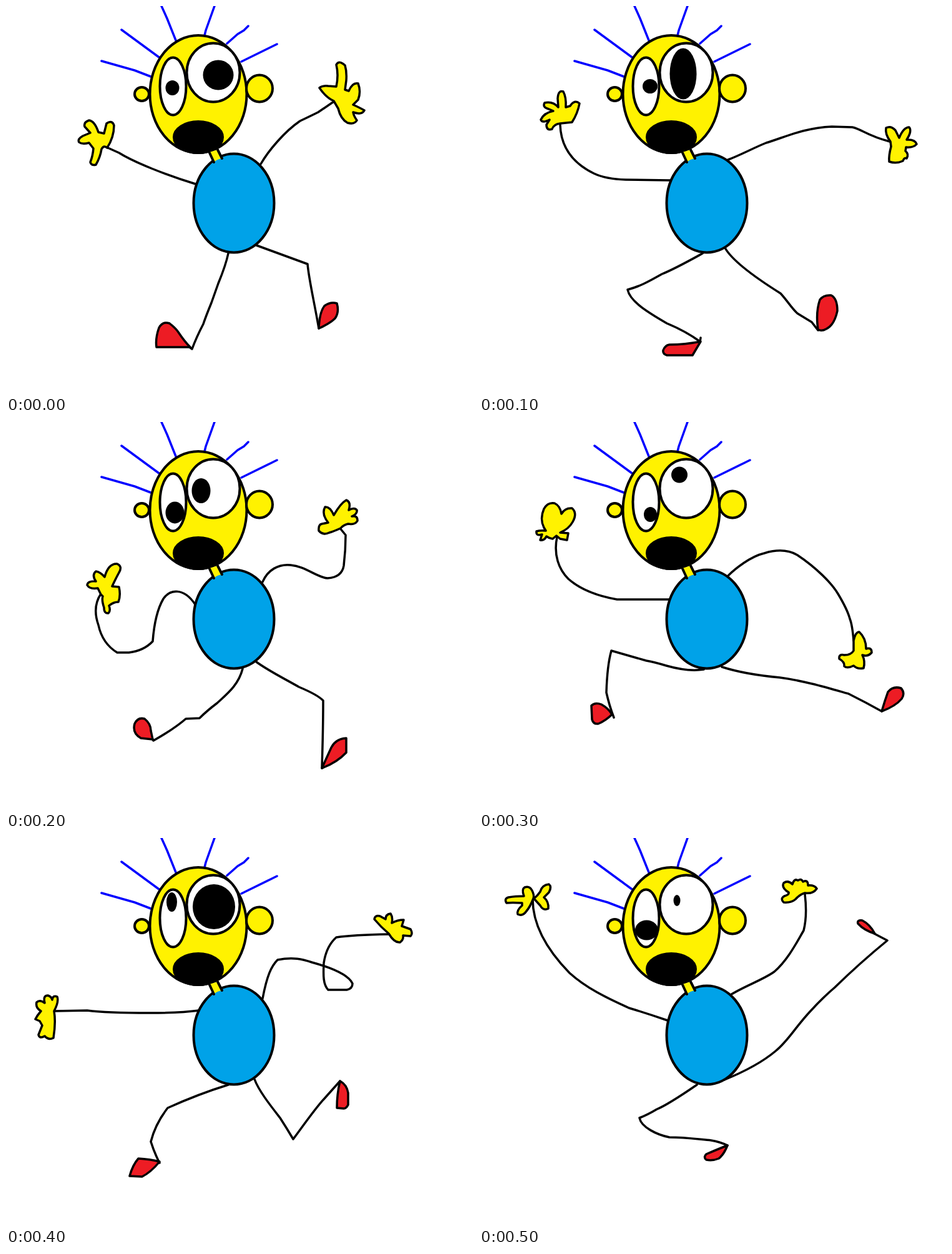
Animation of 748 by 621 pixels, one loop 600 ms. Source, as an HTML page:

```html
<!DOCTYPE html>
<html lang="en">
<head>
<meta charset="utf-8">
<title>Dancing figure</title>
<style>
  html, body { margin: 0; width: 100%; height: 100%; overflow: hidden; background: #fff; }
  svg { display: block; width: 748px; height: 621px; }
  path, ellipse { stroke: #000; stroke-linecap: round; stroke-linejoin: round; }
  .figure { stroke-width: 4; }
  .figure path, .figure ellipse { stroke-width: 4; }
  .figure .hair { fill: none; stroke: #00f; stroke-width: 3.5; }
  .skin { fill: #fff200; }
  .white { fill: #fff; }
  .shirt { fill: #00a2e8; }
  .limbs { fill: none; stroke-width: 3.5; }
  .hands { fill: #fff200; stroke-width: 3.5; }
  .shoes { fill: #ed1c24; stroke-width: 3.5; }
  .pose ellipse { stroke: none; }

  /* Each pose holds for one sixth of the loop. */
  .pose {
    visibility: hidden;
    animation: hold 600ms step-end infinite;
    animation-delay: calc(var(--i) * 100ms - 600ms);
  }
  @keyframes hold {
    0% { visibility: visible; }
    16.666%, 100% { visibility: hidden; }
  }
</style>
</head>
<body>
<svg viewBox="0 0 748 621">
  <g class="figure">
    <path class="hair" d="M153 88L206 103L232 113M185 38L245 82M249 0L258 20L272 55M334 0L320 39L318 47M354 60L371 45L381 39L388 32M377 89L434 61"/>
    <ellipse class="skin" cx="308" cy="141" rx="77.5" ry="94"/>
    <ellipse class="skin" cx="217.500" cy="141" rx="11.5" ry="11"/>
    <ellipse class="skin" cx="406" cy="132" rx="21" ry="21.5"/>
    <ellipse class="white" cx="267.500" cy="128.500" rx="21" ry="46"/>
    <ellipse class="white" cx="332" cy="106.500" rx="42.500" ry="47"/>
    <ellipse cx="308" cy="210" rx="39" ry="25"/>
    <ellipse class="shirt" cx="365" cy="315.500" rx="64.500" ry="79"/>
    <path class="skin" stroke="none" style="stroke:none" d="M326 234L339 230L346 244Q338 245 333 250Z"/>
    <path fill="none" d="M326 235L333 250M339 230L346 244"/>
  </g>

  <g class="pose" style="--i:0">
    <path class="limbs" d="M161 226L181 235C205 250 255 270 304 285M408 253C420 232 446 201 471 184Q490 175 500 170L525 153M356 396Q352 415 340 444L329 475Q320 497 316 509Q305 530 298 549L294 546M401 383L483 413C485 437 493 470 501 516"/>
    <path class="hands" d="M162 227Q173 210 173 191Q170 182 161 188Q159 196 157 204L148 202Q142 184 133 183Q124 186 126 193L135 203L123 208Q114 213 117 218Q122 222 133 219L140 228Q139 240 135 250Q137 256 144 254Q151 242 153 229Q157 222 162 227Z"/>
    <path class="hands" d="M525 152Q512 146 502 131Q506 127 516 128L529 129Q533 110 529 94Q533 86 543 95Q546 105 545 119L543 134L549 136Q555 122 564 124Q569 137 564 150L556 158Q567 163 574 167Q570 175 556 170Q557 176 562 183Q558 190 547 187Q536 181 532 164Z"/>
    <path class="shoes" d="M295 546L241 546Q239 532 245 515Q251 504 262 508Q272 516 276 522Q286 537 295 546ZM501 516Q502 490 510 480Q520 473 530 476Q534 490 527 500Q519 508 501 516Z"/>
    <ellipse cx="266.500" cy="131" rx="11" ry="12"/>
    <ellipse cx="340" cy="110.500" rx="24.500" ry="24"/>
  </g>

  <g class="pose" style="--i:1">
    <path class="limbs" d="M130 190C131 222 147 250 184 268Q203 277 235 278L306 279M399 246C420 238 440 227 460 219C490 210 520 195 565 193L598 194C615 198 620 207 658 217M358 396C338 407 313 421 293 429C270 442 257 449 238 454C242 473 270 490 301 508Q330 520 354 537L355 531M394 387C405 407 440 433 483 460C495 473 500 483 510 492L533 506L543 519"/>
    <path class="hands" d="M130 188L149 186Q158 172 161 156Q153 149 146 160L139 162Q140 146 135 137Q127 134 126 148L127 162Q118 152 105 155Q101 162 112 165L119 168Q104 171 99 182Q101 188 113 182L108 190Q108 200 117 197Q120 189 130 188Z"/>
    <path class="hands" d="M659 217Q650 205 652 195Q660 191 667 199L673 211Q680 194 689 194Q694 200 685 214Q698 213 701 221Q696 227 684 226L683 232Q689 237 685 244Q681 242 679 248Q668 253 657 249Q656 240 660 225Z"/>
    <path class="shoes" d="M355 537L342 559L301 559Q294 557 295 551Q298 543 305 542Q330 542 355 537ZM543 518Q539 490 546 470Q552 462 564 463Q574 468 574 488Q569 511 556 517Q549 521 543 518Z"/>
    <ellipse cx="274" cy="128.500" rx="12" ry="11.500"/>
    <ellipse cx="327" cy="108.500" rx="21.500" ry="41"/>
  </g>

  <g class="pose" style="--i:2">
    <path class="limbs" d="M152 275C142 290 142 308 148 325C153 348 165 361 178 369L197 369Q221 366 235 351C237 325 242 300 252 283C263 267 285 265 303 292M411 256C419 237 436 227 456 229C480 231 498 249 515 250C531 249 539 242 541 230Q544 205 544 181L535 170M379 395C372 422 353 436 338 450Q322 462 310 474L288 475C272 489 252 501 236 510L234 506M401 384C420 398 450 413 469 424Q500 437 508 446Q508 490 506 554"/>
    <path class="hands" d="M152 276L147 266Q134 268 130 261Q131 254 144 255Q137 245 144 239Q151 240 158 248Q164 226 178 227Q187 231 181 241Q175 252 170 263L181 264Q184 278 180 288Q172 288 165 294Q168 302 164 306Q157 307 157 297Q153 285 155 279Z"/>
    <path class="hands" d="M536 170Q525 175 518 177Q508 182 501 174Q500 164 506 163L516 161Q505 147 511 136Q519 135 525 149Q536 130 545 125Q553 128 549 141Q558 136 562 141Q563 147 554 151Q563 149 563 158Q559 165 548 163Q540 165 536 170Z"/>
    <path class="shoes" d="M235 508L216 506Q202 498 206 483Q211 472 222 475Q232 483 232 494ZM506 554L521 521Q528 507 545 506L545 529Q530 545 506 554Z"/>
    <ellipse cx="270.500" cy="145" rx="15" ry="17.500"/>
    <ellipse cx="312.500" cy="110" rx="15" ry="20"/>
  </g>

  <g class="pose" style="--i:3">
    <path class="limbs" d="M125 184C119 213 128 236 143 251Q170 275 221 284L305 284M399 246C410 235 435 215 457 210C480 203 498 206 510 213C540 233 565 258 575 275Q590 300 594 315Q598 325 600 350M360 396Q335 400 300 390Q280 384 268 382L212 366C208 380 205 400 204 433Q209 455 216 473M389 392C420 402 460 407 482 409C520 414 560 426 592 435Q620 449 645 463"/>
    <path class="hands" d="M104 169Q97 155 104 139Q110 128 121 130Q130 134 132 147Q138 137 149 138Q158 146 150 160Q144 171 130 177L143 178L141 189L130 187L124 182L118 187Q112 186 108 183Q105 190 98 189L101 180Q91 183 92 175Q98 173 107 174Z"/>
    <path class="hands" d="M600 366L600 350Q603 336 609 336Q620 346 620 363Q629 360 629 369Q623 376 614 373Q619 383 616 394Q606 396 600 390Q590 395 585 391Q586 384 577 379Q576 371 585 373Q596 373 600 366Z"/>
    <path class="shoes" d="M213 468Q203 478 191 483Q183 484 181 476L180 454Q186 448 196 452Q207 458 213 468ZM645 463Q650 446 655 432Q663 422 676 426Q683 434 677 443Q667 455 645 463Z"/>
    <ellipse cx="274.500" cy="148" rx="10.500" ry="12"/>
    <ellipse cx="321" cy="84.500" rx="13" ry="13"/>
  </g>

  <g class="pose" style="--i:4">
    <path class="limbs" d="M78 277L130 276C160 280 200 280 230 280Q280 280 309 276M411 257C418 220 425 205 435 195C460 190 475 194 490 199C530 210 550 222 555 233Q555 241 546 243L516 243C508 235 508 220 509 200C512 180 520 167 529 159Q555 155 613 154M356 395C330 403 290 418 259 432C245 450 236 470 232 486Q238 505 246 520M398 386C405 405 425 430 439 448Q450 465 460 482C475 462 495 433 510 417L535 389"/>
    <path class="hands" d="M77 277Q80 295 76 320Q68 324 62 317Q54 322 52 315L58 300L54 293L47 290Q50 284 56 277Q47 272 49 263Q54 258 62 264Q59 252 67 252Q73 254 74 259Q75 251 82 254Q85 262 77 277Z"/>
    <path class="hands" d="M613 153Q600 142 590 130Q591 123 599 125L608 130Q608 122 616 121Q620 127 618 136Q627 131 637 131L634 141L648 146Q652 153 648 157L636 156Q637 163 631 167Q622 168 613 153Z"/>
    <path class="shoes" d="M246 518Q231 514 212 513Q203 523 198 541L218 542Q232 535 246 518ZM535 389Q546 395 548 408L548 427Q545 433 541 433L530 432Q530 410 535 389Z"/>
    <ellipse cx="265.500" cy="102.500" rx="8.500" ry="15.500"/>
    <ellipse cx="333" cy="110" rx="34" ry="36"/>
  </g>

  <g class="pose" style="--i:5">
    <path class="limbs" d="M86 98C86 135 105 175 145 216C175 243 210 258 240 272Q270 281 302 292M403 251C425 237 455 227 473 214C495 195 510 165 520 148Q526 125 522 90M349 395C330 408 300 428 285 434Q270 443 257 448C260 463 285 475 305 479C330 479 350 482 372 484Q385 486 398 492M393 387C420 376 450 362 475 341C495 325 505 305 530 278Q550 256 570 239Q610 200 654 164L633 153"/>
    <path class="hands" d="M88 97Q94 92 98 86Q101 75 112 74Q117 78 112 87L104 95Q112 102 111 113Q103 117 98 108ZM87 97Q82 110 76 117Q70 126 62 122Q60 116 69 108L69 104Q52 103 44 104Q40 97 47 95Q58 93 72 93Q68 82 73 79Q81 76 85 84Q89 92 87 97Z"/>
    <path class="hands" d="M522 88Q514 90 507 98Q500 104 488 103Q482 97 489 93Q497 91 496 87Q484 80 488 72Q495 67 502 74Q505 64 511 68Q516 64 519 70Q527 66 527 76Q537 75 541 81Q535 90 522 88Z"/>
    <path class="shoes" d="M398 492Q392 507 384 513Q374 517 364 515Q359 511 364 506Q385 497 398 492ZM634 153Q617 148 607 137Q605 131 614 132Q626 138 634 153Z"/>
    <ellipse cx="268.500" cy="147.500" rx="18.500" ry="16"/>
    <ellipse cx="317" cy="100" rx="5.500" ry="9"/>
  </g>
</svg>
</body>
</html>
```
